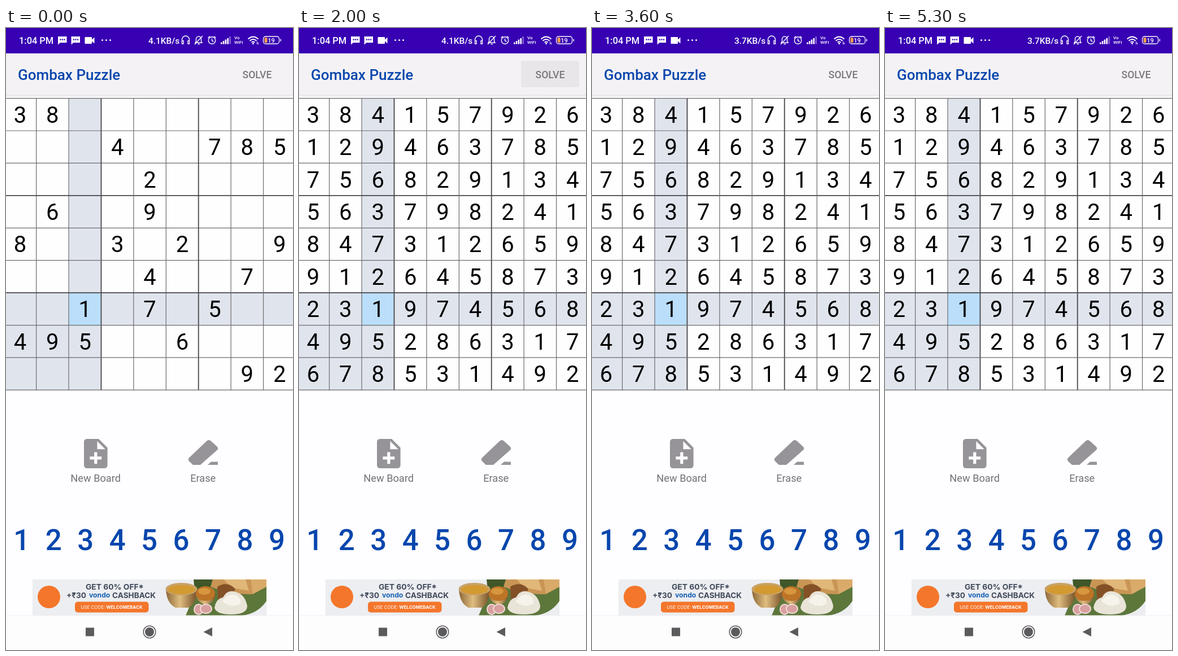
An HTML page for the animation above (5.4 s loop, 508 by 1102 pixels).

```html
<!DOCTYPE html>
<html lang="en">
<head>
<meta charset="utf-8">
<title>Number puzzle</title>
<style>
  html, body { margin: 0; width: 100%; height: 100%; overflow: hidden; background: #fefdff; }
  svg { display: block; width: 100%; height: 100%; font-family: Roboto, sans-serif; }
  .mid { text-anchor: middle; }
  .medium { font-weight: 500; }
  .ad { font-family: Inter, sans-serif; font-weight: 700; fill: #41495a; }
</style>
</head>
<body>
<svg viewBox="0 0 508 1102">
  <defs>
    <linearGradient id="shade" x2="0" y2="1">
      <stop stop-color="#e6e4e7"/><stop offset="1" stop-color="#fefdff"/>
    </linearGradient>
    <linearGradient id="brass">
      <stop stop-color="#8d6736"/><stop offset=".45" stop-color="#dfbd80"/><stop offset="1" stop-color="#765027"/>
    </linearGradient>
    <clipPath id="adClip"><path d="M47 977H461V1041H47z"/></clipPath>
  </defs>

  <!-- status bar -->
  <path fill="#3700b3" d="M0 0H508V45H0z"/>
  <g fill="#fff" class="medium">
    <text x="23" y="28" font-size="16.4">1:04 PM</text>
    <text id="speed" x="252" y="27.500" font-size="15.400"></text>
    <path id="bubble" d="M92 15H107.500V26H96L92 29.500z"/>
    <use href="#bubble" x="23.500"/>
    <path d="M140.500 16H151Q152 16 152 17V20.500L156.500 16.500V27.500L152 23.500V27Q152 28 151 28H140.500Q139.500 28 139.500 27V17Q139.500 16 140.500 16z"/>
    <g fill="#3700b3"><circle cx="96.500" cy="20.500" r="1.200"/><circle cx="100" cy="20.500" r="1.200"/><circle cx="103.500" cy="20.500" r="1.200"/>
      <circle cx="120" cy="20.500" r="1.200"/><circle cx="123.500" cy="20.500" r="1.200"/><circle cx="127" cy="20.500" r="1.200"/></g>
    <circle cx="170.500" cy="21.500" r="1.500"/><circle cx="177.500" cy="21.500" r="1.500"/><circle cx="184.500" cy="21.500" r="1.500"/>
    <g fill="none" stroke="#fff" stroke-width="1.400">
      <path d="M311.500 25V20.500A6.500 6.500 0 0 1 324.500 20.500V25M311.500 22.500H314V28H311.500zM322 22.500H324.500V28H322z"/>
      <path d="M335 26H347L345.500 23.500V19.500A4.500 4.500 0 0 0 336.500 19.500V23.500zM339.500 28.500H343M334 29L348 14"/>
      <circle cx="364.500" cy="22" r="6.200"/><path d="M364.500 18.500V22.500L367.500 24M357.500 17.500L361 14.500M368 14.500L371.500 17.500"/>
    </g>
    <path d="M380 25.500h2.600v3h-2.600zM383.800 23h2.600v5.500h-2.600zM387.600 20.500h2.600v8h-2.600zM391.400 18h2.600v10.500h-2.600z"/>
    <path opacity=".4" d="M395.200 15h2.600v13.500h-2.600z"/>
    <text x="404" y="20" font-size="8">Vo</text><text x="404" y="28" font-size="8">WiFi</text>
    <g fill="none" stroke="#fff" stroke-width="1.900">
      <path d="M428.500 19.500Q437.500 11.500 446.500 19.500M431.500 22.700Q437.500 17.500 443.500 22.700M434.500 25.500Q437.500 23 440.500 25.500"/>
    </g>
    <circle cx="437.500" cy="27.500" r="1.500"/><path d="M444 24h1v5h-1zM446 26h1v3h-1z"/>
    <rect x="455.500" y="15" width="28" height="13" rx="4" fill="none" stroke="#fff" stroke-width="1.300"/>
    <path d="M485.500 19.500h1.500v4h-1.500z"/><rect x="457.500" y="17" width="5" height="9" rx="1.500" fill="#f3a04b"/>
    <text x="469.500" y="25.500" font-size="11" class="mid">19</text>
  </g>

  <!-- app bar -->
  <path fill="#f4f2f4" d="M0 45H508V118H0z"/>
  <path fill="url(#shade)" d="M0 118H508V124H0z"/>
  <text x="21" y="92" font-size="26" class="medium" fill="#0746ad">Gombax Puzzle</text>
  <rect id="press" x="393" y="58" width="103" height="47" rx="2" fill="#000"/>
  <text x="444.500" y="88.500" font-size="17.600" class="medium mid" fill="#7a787b">SOLVE</text>

  <g id="shading"></g>
  <g id="lines" fill="none"></g>
  <g id="given" class="mid" font-size="40"></g>
  <g id="solved" class="mid" font-size="40"></g>

  <!-- actions -->
  <g fill="#979499">
    <path transform="translate(127.600 722.800) scale(2.600)" d="M14 2H6a2 2 0 0 0-2 2V20a2 2 0 0 0 2 2H18a2 2 0 0 0 2-2V8zm2 14h-3v3h-2v-3H8v-2h3v-3h2v3h3v2zm-3-7V3.500L18.500 9z"/>
    <path d="M355.500 731.500Q359 728.500 362.500 731.500L373.500 741.500Q377 745 373.500 748L344 774H331L324.500 768Q321 764.500 324.500 761z"/>
    <path d="M363 768.500H375V774H357z"/>
  </g>
  <g class="mid" font-size="18.200" fill="#737174">
    <text x="158.700" y="804">New Board</text><text x="348.700" y="804">Erase</text>
  </g>
  <g id="pad" class="mid medium" font-size="51" fill="#0746ad"></g>

  <!-- banner -->
  <g clip-path="url(#adClip)">
    <path fill="#eceef1" d="M47 977H461V1041H47z"/>
    <circle cx="76" cy="1008" r="20" fill="#f4762b"/>
    <g class="ad">
      <text x="141" y="995" font-size="13.800">GET 60% OFF*</text>
      <text x="107" y="1010" font-size="13.600">+₹30</text>
      <text x="147" y="1008.500" font-size="12.200" style="fill:#1760b5">vondo</text>
      <text x="188" y="1010" font-size="13.600">CASHBACK</text>
    </g>
    <rect x="122" y="1016.500" width="130.500" height="19" rx="5" fill="#f4762b"/>
    <text x="187" y="1029.300" font-size="8" class="ad mid" style="fill:#fff"><tspan font-weight="400">USE CODE:</tspan> WELCOMEBACK</text>
    <path fill="#5d773b" d="M318 1041L345 977H461V1015Q447 1037 418 1041z"/>
    <path fill="#3f5729" d="M332 977H368L360 995H334z"/>
    <path fill="#c99555" d="M366 977H452L437 1003Q400 1005 362 990z"/>
    <path fill="#e0b778" d="M385 977H424L430 997L400 992z"/>
    <path fill="#d9aa69" d="M433 977H461V990L437 1003z"/>
    <path fill="#845126" d="M374 990Q392 979 406 994L398 1010L375 1012z"/>
    <path fill="url(#brass)" d="M283 994H338Q337 1019 323 1027H300Q284 1019 283 994z"/>
    <ellipse cx="310.500" cy="994" rx="28" ry="11" fill="#c8a268"/>
    <ellipse cx="310.500" cy="995" rx="24" ry="8" fill="#d39a31"/>
    <path fill="url(#brass)" d="M335 1002H371Q369 1019 354 1022Q338 1019 335 1002z"/>
    <ellipse cx="353" cy="1002" rx="17" ry="13" fill="#bd7427"/>
    <ellipse cx="351" cy="998" rx="11" ry="6" fill="#d6973e"/>
    <g fill="#d9a0a0" stroke="#f1dbd7" stroke-width="2">
      <ellipse cx="341" cy="1030" rx="8" ry="9"/><ellipse cx="354" cy="1029" rx="10" ry="8"/>
    </g>
    <path fill="#e9e4d8" d="M369 1027Q372 1011 384 1009Q392 994 406 999Q423 1003 427 1024Q427 1039 398 1039Q372 1039 369 1027z"/>
    <path fill="#f6f3ea" d="M383 1016Q393 1000 407 1005Q417 1010 415 1020Q399 1029 383 1016z"/>
    <text x="442" y="1037" font-size="5.500" fill="#eee">*T&amp;CA</text>
  </g>

  <!-- navigation bar -->
  <path fill="#fefdfe" d="M0 1041H508V1102H0z"/>
  <path fill="#f1f0f2" d="M0 1040.500H508V1041.500H0z"/>
  <g fill="#5c5a5d">
    <path d="M141 1062.500H156V1077.500H141zM349.500 1070L365 1062V1078z"/>
    <circle cx="254" cy="1070" r="8"/>
    <circle cx="254" cy="1070" r="10.800" fill="none" stroke="#5c5a5d" stroke-width="1.500"/>
  </g>
</svg>
<script>
const LOOP = 5400, STEP = 100;
const PRESS_AT = 1900, SOLVE_AT = 2000, RELEASED_AT = 2400, SPEED_AT = 3600;
const CELL = 57.42, LEFT = -3.8, TOP = 124.6;
const SOLUTION = "384157926 129463785 756829134 563798241 847312659 912645873 231974568 495286317 678531492".split(" ");
const GIVENS = "38....... ...4..785 ....2.... .6..9.... 8..3.2..9 ....4..7. ..1.7.5.. 495..6... .......92".split(" ");
const PICK = { row: 6, col: 2 };

const byId = id => document.getElementById(id);

function add(parent, tag, attrs, text = "") {
  const el = document.createElementNS("http://www.w3.org/2000/svg", tag);
  for (const key in attrs) el.setAttribute(key, attrs[key]);
  el.textContent = text;
  byId(parent).append(el);
}

function buildBoard() {
  for (let row = 0; row < 9; row++) {
    for (let col = 0; col < 9; col++) {
      const x = LEFT + col * CELL, y = TOP + row * CELL;
      const picked = row === PICK.row && col === PICK.col;
      const related = row === PICK.row || col === PICK.col || (row > 5 && col < 3);
      const fill = picked ? "#bbdefb" : related ? "#e0e5ed" : "#fefeff";
      add("shading", "rect", { x, y, width: CELL + .3, height: CELL + .3, fill });
      const layer = GIVENS[row][col] === "." ? "solved" : "given";
      add(layer, "text", { x: x + CELL / 2, y: y + 43.2 }, SOLUTION[row][col]);
    }
  }
  for (let i = 0; i < 10; i++) {
    const bold = i % 3 === 0 && i > 0 && i < 9;
    const style = { stroke: bold ? "#48464a" : "#6c6a6d", "stroke-width": bold ? 1.8 : 1.2 };
    const x = LEFT + i * CELL, y = TOP + i * CELL;
    add("lines", "path", { d: `M${x} ${TOP}V${TOP + 9 * CELL}`, ...style });
    add("lines", "path", { d: `M0 ${y}H508`, ...style });
  }
  for (let n = 1; n < 10; n++) {
    add("pad", "text", { x: 27.8 + (n - 1) * 56.45, y: 925 }, n);
  }
}

function pressOpacity(time) {
  if (time < PRESS_AT || time >= RELEASED_AT) return 0;
  return time <= SOLVE_AT ? .05 : .05 * (RELEASED_AT - time) / (RELEASED_AT - SOLVE_AT);
}

function render(now) {
  const time = Math.floor(now % LOOP / STEP) * STEP;
  byId("solved").setAttribute("visibility", time < SOLVE_AT ? "hidden" : "visible");
  byId("press").setAttribute("opacity", pressOpacity(time));
  byId("speed").textContent = time < SPEED_AT ? "4.1KB/s" : "3.7KB/s";
}

buildBoard();
const start = performance.now();
function tick() {
  render(performance.now() - start);
  requestAnimationFrame(tick);
}
tick();
</script>
</body>
</html>
```
